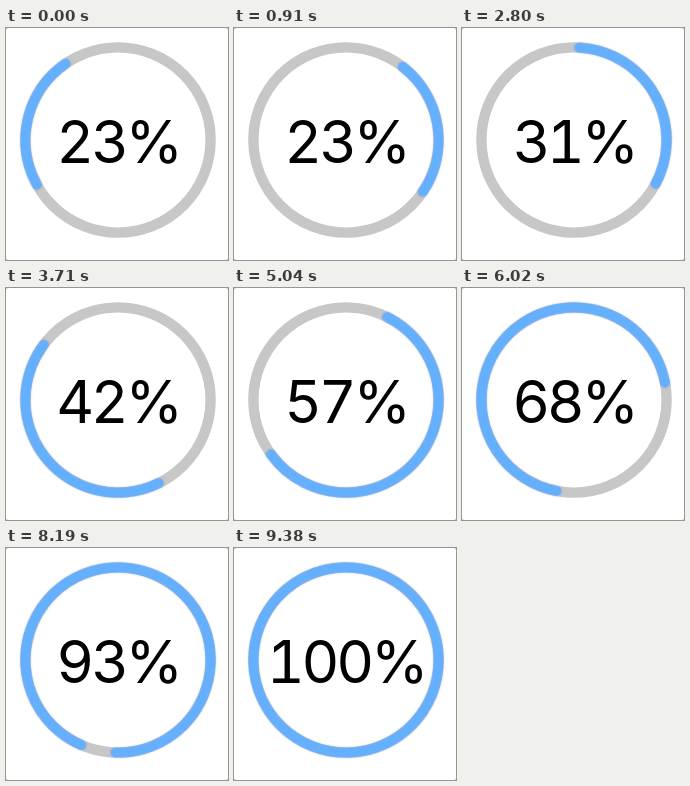
An HTML page for the animation above (9450 ms loop, 222 px wide and 232 px high).

```html
<!DOCTYPE html>
<html lang="en">
<head>
<meta charset="utf-8">
<title>Progress ring</title>
<style>
  html, body { margin: 0; width: 100%; height: 100%; overflow: hidden; background: #fff; }
  svg { display: block; width: 100vw; height: 100vh; }
  circle { fill: none; stroke-width: 10.4; }
  #arc {
    stroke: #65afff; stroke-width: 9.8; stroke-linecap: round;
    filter: drop-shadow(0 0 1.2px rgba(70, 90, 110, .3));
  }
  text {
    font: 400 58.5px Inter, "Liberation Sans", sans-serif;
    font-variant-numeric: tabular-nums;
    letter-spacing: -3.2px;
    text-anchor: middle;
  }
</style>
</head>
<body>
<svg viewBox="0 0 222 232">
  <rect width="222" height="232" fill="#b4b4b4"/>
  <rect width="222" height="232" rx="2.5" fill="#fff"/>
  <circle cx="112" cy="112" r="92.6" stroke="#c7c7c7"/>
  <circle id="arc" cx="112" cy="112" r="92.6" pathLength="100"/>
  <text id="label" x="112" y="135"></text>
</svg>
<script>
const STEP = 70, LOOP = 9450, TURN = 30;
const arc = document.getElementById('arc');
const label = document.getElementById('label');

// Start of the arc in degrees from the top: one turn per 30 steps, slightly eased.
const spin = n => 240.9 + 360 * n / TURN + 3 * Math.cos(2 * Math.PI * (n - 7) / TURN);

// Almost waits at first, then fills at a steady rate and rests when full.
const progress = n => Math.min(100, Math.max(23.4 + 0.04 * n, 0.805 * n - 0.27));

function draw(ms) {
  const n = Math.floor(ms % LOOP / STEP);
  const percent = progress(n);
  arc.setAttribute('transform', `rotate(${spin(n) - 90} 112 112)`);
  arc.setAttribute('stroke-dasharray', percent < 100 ? `${percent} 100` : 'none');
  label.textContent = Math.floor(percent) + '%';
}

const begin = performance.now();
function tick() {
  draw(performance.now() - begin);
  requestAnimationFrame(tick);
}
draw(0);
requestAnimationFrame(tick);
</script>
</body>
</html>
```
